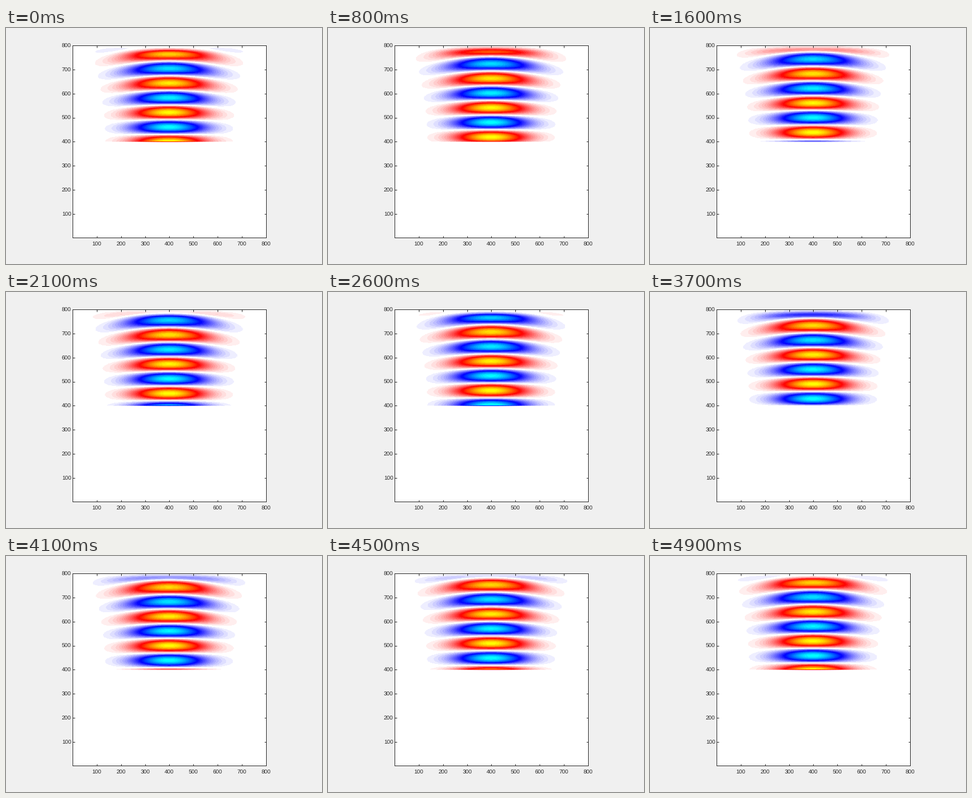
Recreate the animation shown at these times as a matplotlib script. Size 560 by 420 pixels, loop 5000 ms.

```python
import numpy as np
import matplotlib.pyplot as plt
from matplotlib.animation import FuncAnimation

WIDTH, HEIGHT, DPI = 560, 420, 100
PX = 72 / DPI                      # one pixel in points
FRAMES, INTERVAL = 50, 100
INK = (0.15, 0.15, 0.15)

SIZE, SOURCE_ROW = 800, 400
WAVELENGTH, WAIST, CENTRE = 119.5, 141.5, 399.2
ABSORBER = 40                      # depth of the absorbing layer at the top
SHADES = 32                        # colour steps from white to the brightest tone

x = np.arange(1, SIZE + 1)[None, :]
y = np.arange(SOURCE_ROW, SIZE + 1)[:, None]
z = y - SOURCE_ROW
r2 = (x - CENTRE) ** 2

# Two-dimensional Gaussian beam launched upwards from its waist
k = 2 * np.pi / WAVELENGTH
rayleigh = np.pi * WAIST ** 2 / WAVELENGTH
spread = np.sqrt(1 + (z / rayleigh) ** 2)
amplitude = np.exp(-r2 / (WAIST * spread) ** 2) / np.sqrt(spread)
phase = (k * (z - 1) + k * r2 * z / (2 * (z ** 2 + rayleigh ** 2))
         - 0.5 * np.arctan(z / rayleigh))

depth = np.clip((y - (SIZE - ABSORBER)) / ABSORBER, 0, 1)
amplitude *= np.exp(-3.5 * depth ** 3)
amplitude *= np.where(z <= 1, 0.5, 1.0)


def colourise(field):
    """White-red-yellow for positive values, white-blue-cyan for negative."""
    shade = np.floor(np.minimum(np.abs(field), 0.999) * SHADES)
    level = 2 * shade / (SHADES - 1)
    fade = np.clip(1 - level, 0, 1)
    glow = np.clip(level - 1, 0, 1)
    positive = field >= 0
    return np.dstack([np.where(positive, 1, fade), fade + glow,
                      np.where(positive, fade, 1)])


def beam(frame):
    return colourise(amplitude * np.cos(phase - 2 * np.pi * frame / FRAMES))


plt.rcParams.update({"font.family": "Liberation Sans", "text.hinting": "none"})
fig = plt.figure(figsize=(WIDTH / DPI, HEIGHT / DPI), dpi=DPI, facecolor="#f0f0f0")
ax = fig.add_axes([118.3 / WIDTH, 46.6 / HEIGHT, 342.7 / WIDTH, 342.3 / HEIGHT])

image = ax.imshow(beam(0), origin="lower", interpolation="nearest", aspect="auto",
                  extent=(0.5, SIZE + 0.5, SOURCE_ROW - 0.5, SIZE + 0.5))
ax.set(xlim=(1, SIZE), ylim=(1, SIZE))
ticks = np.arange(100, SIZE + 1, 100)
ax.set_xticks(ticks)
ax.set_yticks(ticks)
ax.tick_params(direction="in", top=True, right=True, length=3.5 * PX, width=PX,
               color=INK, labelcolor=INK, labelsize=10 * PX)
ax.tick_params(axis="x", pad=7.5 * PX)
ax.tick_params(axis="y", pad=2.7 * PX)
for spine in ax.spines.values():
    spine.set(linewidth=PX, edgecolor=INK)


def update(frame):
    image.set_data(beam(frame))
    return [image]


animation = FuncAnimation(fig, update, frames=FRAMES, interval=INTERVAL,
                          repeat=True, repeat_delay=0)
plt.show()
```
